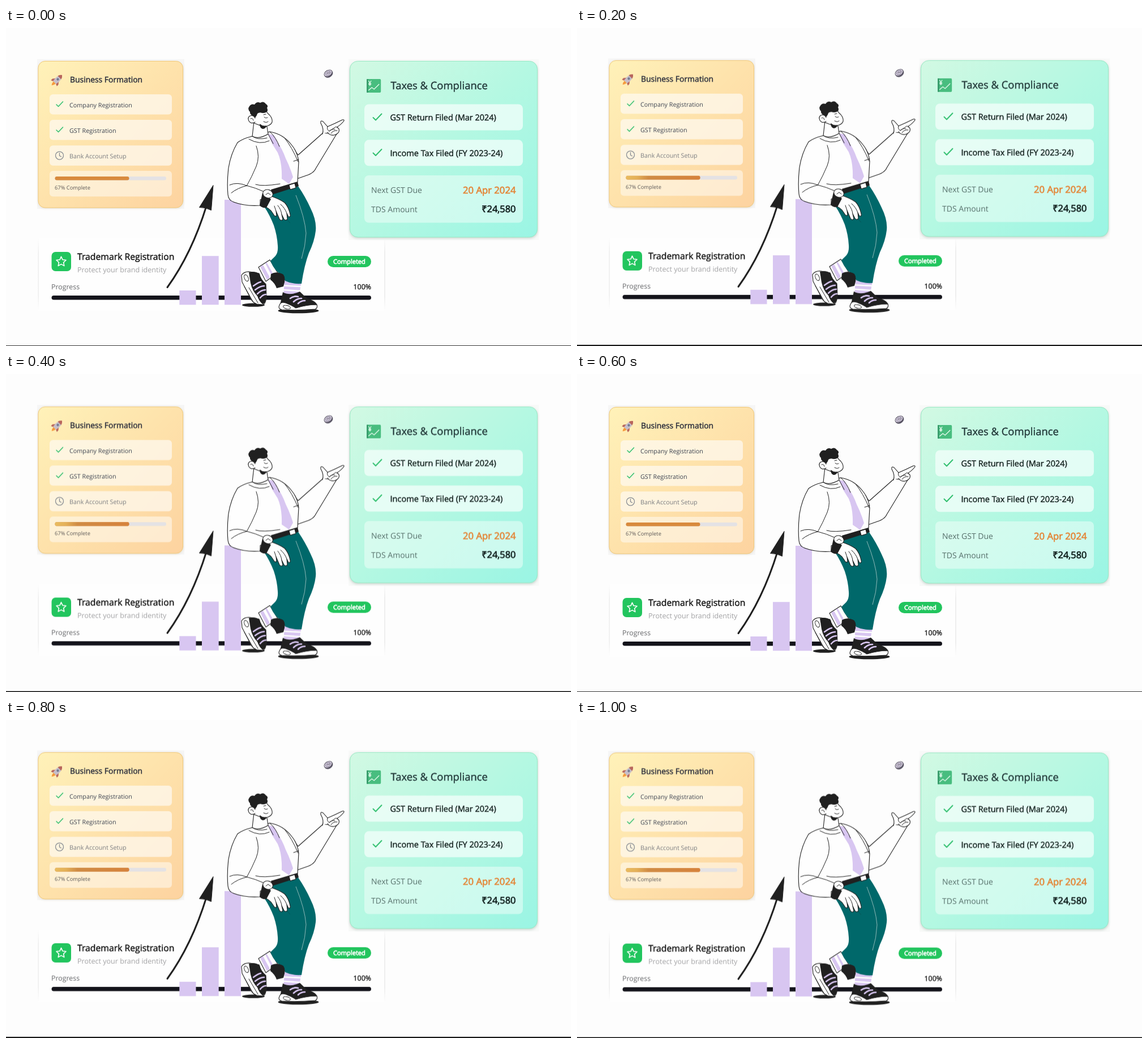
Animation, 998 px wide and 561 px high, one loop 1200 ms. Source, as an HTML page:

```html
<!DOCTYPE html>
<html lang="en">
<head>
<meta charset="utf-8">
<title>Business dashboard</title>
<style>
html, body { margin: 0; width: 100%; height: 100%; overflow: hidden; background: #000; }
svg { display: block; width: 100vw; height: 100vh; }
text { font-family: "Open Sans", "Noto Sans", sans-serif; text-rendering: geometricPrecision; }
.semi { stroke: currentColor; stroke-width: .42; }
.bold { stroke: currentColor; stroke-width: .7; }
.ink { fill: #fefefe; stroke: #202020; stroke-width: 1.1; stroke-linejoin: round; stroke-linecap: round; }
.line { fill: none; stroke: #202020; stroke-width: 1; stroke-linecap: round; stroke-linejoin: round; }
.dark { fill: #202020; }
.lilac { fill: #d8c6f1; }
.tick { fill: none; stroke: #2fbf6d; stroke-linecap: round; stroke-linejoin: round; }
</style>
</head>
<body>
<svg viewBox="0 0 998 561" preserveAspectRatio="none">
<defs>
  <linearGradient id="sun" x2="1" y2="1"><stop stop-color="#fff2b9"/><stop offset=".5" stop-color="#fee2ab"/><stop offset="1" stop-color="#fdd3a0"/></linearGradient>
  <linearGradient id="mint" x2="1" y2="1"><stop stop-color="#d2f9e3"/><stop offset=".5" stop-color="#b4f8e2"/><stop offset="1" stop-color="#9af5e4"/></linearGradient>
  <linearGradient id="amber"><stop stop-color="#e9bc5f"/><stop offset=".15" stop-color="#e4b058"/><stop offset=".3" stop-color="#d08c45"/><stop offset="1" stop-color="#d6823c"/></linearGradient>
  <linearGradient id="edge" x2="0" y2="1"><stop stop-color="#eee" stop-opacity="0"/><stop offset=".2" stop-color="#eee"/><stop offset=".8" stop-color="#eee"/><stop offset="1" stop-color="#eee" stop-opacity="0"/></linearGradient>
  <filter id="soft" x="-10%" y="-10%" width="120%" height="120%"><feGaussianBlur stdDeviation="2"/></filter>
</defs>
<g id="scene">
  <rect y="-4" width="998" height="564.2" fill="#fdfdfd"/>

  <!-- trademark panel -->
  <rect x="57" y="371" width="611" height="128" fill="#fefefe"/>
  <rect x="56.5" y="371" width="1.5" height="127" fill="url(#edge)"/>
  <rect x="668" y="371" width="2" height="127" fill="url(#edge)"/>
  <rect x="80.5" y="395" width="34.5" height="34" rx="7" fill="#22c55e"/>
  <path id="star" fill="none" stroke="#fff" stroke-width="1.6" stroke-linejoin="round"/>
  <rect x="80.5" y="472" width="564.5" height="7.6" rx="3.8" fill="#14141b"/>
  <rect x="568" y="402" width="77" height="20" rx="10" fill="#22c55e"/>

  <!-- growth chart -->
  <g class="lilac">
    <rect x="306.3" y="463" width="29.2" height="25.3"/>
    <rect x="346" y="402.2" width="29.7" height="86"/>
    <rect x="386" y="303" width="29" height="185.3"/>
  </g>
  <path d="M285 457.5Q328 398 354 314" fill="none" stroke="#202020" stroke-width="3" stroke-linecap="round"/>
  <path d="M366 277.5L341.500 316.500Q352 316 362.500 321.500Z" class="dark" stroke="#202020" stroke-linejoin="round"/>

  <!-- feet -->
  <ellipse class="dark" cx="437" cy="488.7" rx="20" ry="3.1"/>
  <ellipse class="dark" cx="516.5" cy="498.7" rx="36" ry="4.6"/>
  <path class="ink" d="M446 422L466 409L480 432L459 447Z" stroke-width=".8"/>
  <path class="lilac" d="M449 421L454 418L466 440L461 444Z"/>
  <path class="lilac" d="M458 415L460.500 413.500L472 434L469 436.500Z"/>
  <path class="ink" d="M416 436Q421 429 431 430L447 433Q449 443 459 452L460 473Q459 488 453 488L443 487Q434 484 430 473L417 448Z"/>
  <path class="dark" d="M429 431Q440 428 448 434Q450 444 459 452L460 473Q459 487 453 487Q447 482 444 473Q435 464 432 450Z"/>
  <ellipse class="line" cx="424.500" cy="441" rx="3.3" ry="6" transform="rotate(-24 424.500 441)"/>
  <path class="line" d="M429 458L445 485M421 456L437 484"/>
  <path d="M437 455Q445 449 450 448M440 462Q449 455 456 455M444 469Q451 462 458 462M449 476Q454 470 459 470" fill="none" stroke="#d8c6f1" stroke-width="2.6" stroke-linecap="round"/>

  <path class="lilac" d="M492 446L522 448L517 474L490 472Z"/>
  <path d="M491 454.500L521 456M490 462L519 464" stroke="#fefefe" stroke-width="2.6"/>
  <path class="dark" d="M489 466Q501 473 519 465Q525 471 532 477Q549 482 550 490L548 496H488Q481 492 485 484Z"/>
  <path class="ink" d="M483 489Q485 482 494 485Q505 489 512 494Q532 488 549 488Q551 494 546 496Q514 499 487 497Q480 495 483 489Z"/>
  <ellipse class="line" cx="496" cy="492.500" rx="6.500" ry="3" transform="rotate(14 496 492.500)"/>
  <path d="M502 477Q508 472 516 474M508 483Q514 477 522 477M516 486Q521 481 528 481" fill="none" stroke="#d8c6f1" stroke-width="2.7" stroke-linecap="round"/>

  <!-- trousers -->
  <path d="M456 315Q463 302 470 293L516 279Q529 298 538 318Q549 340 547 358Q545 376 535 397Q527 418 522 451Q505 452 493 446L488 436Q475 430 467 411Q472 406 476 402Q481 396 480 384Q479 366 473 348Q466 330 456 315Z" fill="#00686a"/>
  <path class="dark" d="M468 434Q478 428 490 435Q495 442 490 456L478 459Q475 450 467 444Z"/>
  <path d="M512 295Q528 335 530 362Q529 385 522 407" fill="none" stroke="#b4cdcb" stroke-width=".8"/>
  <path d="M488 319Q494 338 502 344" fill="none" stroke="#0b5152" stroke-width=".8"/>

  <!-- raised arm -->
  <path class="ink" d="M510 216L516 224L560 185L584 187L547 248Q544 255 534 259L514 266Z"/>
  <path class="ink" d="M559 187Q562 178 556 168Q555 162 560 165L568 174Q580 169 594 162Q599 161 596 165Q590 172 584 175Q590 177 588 183Q585 188 579 189Q572 190 568 184"/>
  <path class="line" d="M568 174Q566 179 571 182L583 174M571 182Q576 177 581 179M574 186Q578 180 585 181"/>

  <!-- shirt -->
  <path class="ink" d="M435 191Q418 195 409 202Q397 222 393 247Q390 272 392 294Q393 304 402 307Q423 315 449 313L470 287L515 272L517 236Q515 219 505 207Q490 187 466 183Z"/>
  <path class="lilac" d="M463 187L473 189L479 201Q488 213 494 230Q502 246 507 263L500 275L487 266Q488 238 480 220L470 204Z"/>
  <path class="line" d="M466 183Q477 193 483 209M463 187L472 204M435 191Q444 198 461 194M429 196Q448 207 465 199M442 208Q449 227 442 244Q434 263 426 277M425 278Q408 271 395 277M426 278Q409 282 398 291M425 278Q441 282 454 288M492 194Q505 210 516 236M508 235L517 232M441 276Q453 280 484 275"/>

  <!-- belt -->
  <path class="dark" d="M468 285L515 271L517 279L470 294Z"/>
  <path class="ink" d="M500 277L510 274L512 282L502 285Z"/>

  <!-- resting hand and watch -->
  <path class="ink" d="M449 303L466 296Q482 301 492 308Q499 315 502 329Q503 334 499 333L496 327L497 337Q494 341 491 337L487 329L489 338Q486 341 483 337L477 323L478 331Q475 334 472 328Q466 316 449 313Z"/>
  <path class="line" d="M485 311Q493 318 496 327M480 313Q486 320 487 329M474 314L477 323"/>
  <path class="dark" d="M453 291L468 302L460 317Q452 318 448 313Z"/>
  <ellipse class="ink" cx="462.500" cy="292.500" rx="9" ry="7.300" transform="rotate(20 462.500 292.500)"/>
  <path class="line" d="M459 294L463 291L467 294"/>

  <!-- head -->
  <path class="ink" d="M438 165L435 191Q447 197 463 187L461 174Z"/>
  <path class="ink" d="M434 151L460 147Q462 151 466 154Q471 160 470 166Q468 171 461 173Q454 178 449 172L436 167Z"/>
  <path class="dark" d="M448 169Q454 174 460 172Q459 178 453 178Q448 176 448 169Z"/>
  <path class="dark" d="M437 156Q430 152 431 148Q426 143 430 138Q433 133 439 135Q443 129 449 132Q455 128 459 134Q464 137 461 141Q464 146 459 149Q454 151 449 149Q444 149 443 154L439 160Z"/>
  <path class="ink" d="M440 159Q437 153 431 155Q426 158 429 164Q433 170 440 166"/>
  <path class="line" d="M432 160Q436 158 437 163M456 157Q458 160 462 158M455 153L459 152M455 165Q460 168 463 165"/>

  <!-- coin -->
  <g transform="rotate(-32 569.500 80.500)">
    <ellipse cx="569.500" cy="81.500" rx="8" ry="5.800" fill="#5a5666"/>
    <ellipse cx="569.500" cy="79.600" rx="7.700" ry="5" fill="#ddd5e7" stroke="#4a4654" stroke-width=".9"/>
    <ellipse cx="569.500" cy="79.600" rx="5" ry="2.800" fill="none" stroke="#6b6578" stroke-width=".8"/>
    <path d="M567 80L569 78.500L571 80.500L573 79" fill="none" stroke="#45404f" stroke-width=".8"/>
  </g>

  <!-- formation card -->
  <rect x="55" y="55" width="260" height="264" fill="#f6f6f6"/>
  <rect x="57" y="60" width="256" height="258" rx="12" fill="#c9b99b" opacity=".4" filter="url(#soft)"/>
  <rect x="57" y="58.500" width="255.500" height="258.500" rx="12" fill="url(#sun)" stroke="#f0c878"/>
  <g transform="translate(90.500 91.500) rotate(45) scale(.93)">
    <path d="M-3 7Q-3 12 0 15Q3 12 3 7Z" fill="#f59a3c"/>
    <path d="M-4 0L-8 5V9L-3 7ZM4 0L8 5V9L3 7Z" fill="#b8655c"/>
    <path d="M0-13Q7-7 4 7H-4Q-7-7 0-13Z" fill="#c6bec9"/>
    <path d="M0-13Q4-10 4.600-6H-4.600Q-4-10 0-13Z" fill="#b8655c"/>
    <circle cy="-1.500" r="2.300" fill="#6f7b92"/>
  </g>
  <g fill="#fffaf0" fill-opacity=".74">
    <rect x="77" y="117" width="216" height="35.500" rx="6"/>
    <rect x="77" y="162" width="216" height="35.500" rx="6"/>
    <rect x="77" y="207.300" width="216" height="35.500" rx="6"/>
    <rect x="77" y="252" width="216" height="45.300" rx="6" opacity=".8"/>
  </g>
  <path class="tick" stroke-width="1.500" d="M89 135L92.500 138.500L100.500 130M89 180L92.500 183.500L100.500 175"/>
  <g fill="none" stroke="#858b92" stroke-width="1.250" stroke-linecap="round"><circle cx="94.500" cy="225" r="7"/><path d="M94.500 220.500V225.300L97.500 227"/></g>
  <rect x="86.500" y="262" width="196.500" height="6.400" rx="3.200" fill="#e4e2e4"/>
  <rect x="86.500" y="262" width="131" height="6.400" rx="3.200" fill="#d88a3d"/>
  <rect id="glow" x="86.500" y="262" width="131" height="6.400" rx="3.200" fill="url(#amber)"/>

  <!-- tax card -->
  <rect x="605" y="55" width="336" height="319" fill="#f8f9f8"/>
  <rect x="607" y="61" width="332" height="310" rx="14" fill="#8fa79c" opacity=".45" filter="url(#soft)"/>
  <rect x="607.500" y="58.500" width="331" height="310.500" rx="14" fill="url(#mint)" stroke="#98e8c3"/>
  <g transform="translate(-.8 0)">
    <rect x="638" y="90" width="25" height="24" rx="2" fill="#48bd7f"/>
    <path d="M638 90H640.500V114H638Z" fill="#37996a"/>
    <path d="M641 93L643.500 96.500L646 93M643.500 96.500V102M641 97.500H646M641 99.700H646M641 110L647 105L651 108L660 99" fill="none" stroke="#effff5" stroke-width="1.250"/>
  </g>
  <g fill="#f5fffb">
    <rect x="633" y="134.500" width="280" height="46" rx="8" opacity=".75"/>
    <rect x="633" y="197.300" width="280" height="46" rx="8" opacity=".75"/>
    <rect x="633" y="260" width="280" height="83.500" rx="8" opacity=".5"/>
  </g>
  <path class="tick" stroke-width="1.900" d="M648.500 158L653 162.500L663.500 151.500M648.500 220.500L653 225L663.500 214"/>

  <g id="copy"></g>
</g>
</svg>
<script>
const NS = "http://www.w3.org/2000/svg";
const byId = id => document.getElementById(id);

// words, x, baseline, size, colour, weight class, anchor
const labels = [
  ["Business Formation", 113, 96.4, 13.9, "#272b3a", "semi"],
  ["Company Registration", 112, 139.5, 10.78, "#3c4350"],
  ["GST Registration", 112, 184.8, 10.78, "#3c4350"],
  ["Bank Account Setup", 112, 229.7, 10.8, "#7b7d80"],
  ["67% Complete", 86, 285, 9.35, "#5b5857"],
  ["Taxes & Compliance", 679.5, 108, 18.4, "#23393a", "semi"],
  ["GST Return Filed (Mar 2024)", 678.5, 163.3, 14.43, "#14201f", "semi"],
  ["Income Tax Filed (FY 2023-24)", 678.5, 226.1, 14.55, "#14201f", "semi"],
  ["Next GST Due", 645, 291.2, 14, "#57706b"],
  ["TDS Amount", 645, 325, 14, "#57706b"],
  ["20 Apr 2024", 900.5, 291.8, 16.7, "#e3873a", "bold", "end"],
  ["₹24,580", 900.5, 325.4, 16.4, "#12201f", "bold", "end"],
  ["Trademark Registration", 126, 408.6, 15.75, "#151515", "semi"],
  ["Protect your brand identity", 126, 430.8, 12.57, "#a2a2a4"],
  ["Progress", 80, 460.8, 12.4, "#66676a"],
  ["100%", 645, 460.5, 12.4, "#222", "semi", "end"],
  ["Completed", 606.5, 416.2, 11.1, "#fff", "bold", "middle"]
];
for (const [words, x, y, size, color, weight = "", anchor = "start"] of labels) {
  const t = document.createElementNS(NS, "text");
  const attrs = { x, y, "font-size": size, fill: color, color, class: weight, "text-anchor": anchor };
  for (const key in attrs) t.setAttribute(key, attrs[key]);
  t.textContent = words;
  byId("copy").append(t);
}

const points = Array.from({ length: 10 }, (_, i) => {
  const a = i * Math.PI / 5 - Math.PI / 2, r = i % 2 ? 4.3 : 9;
  return `${97.5 + r * Math.cos(a)} ${412.3 + r * Math.sin(a)}`;
});
byId("star").setAttribute("d", `M${points.join("L")}Z`);

// three held poses, repeated
function hold(id, prop, values) {
  const steps = [...values, values[0]].map((v, i) => (
    { [prop]: v, offset: i / values.length, easing: "step-end" }
  ));
  byId(id).animate(steps, { duration: 600, iterations: Infinity });
}
hold("scene", "transform", [0, -1.2, -.6].map(y => `translateY(${y}px)`));
hold("glow", "opacity", [0, 1, 1]);
</script>
</body>
</html>
```
